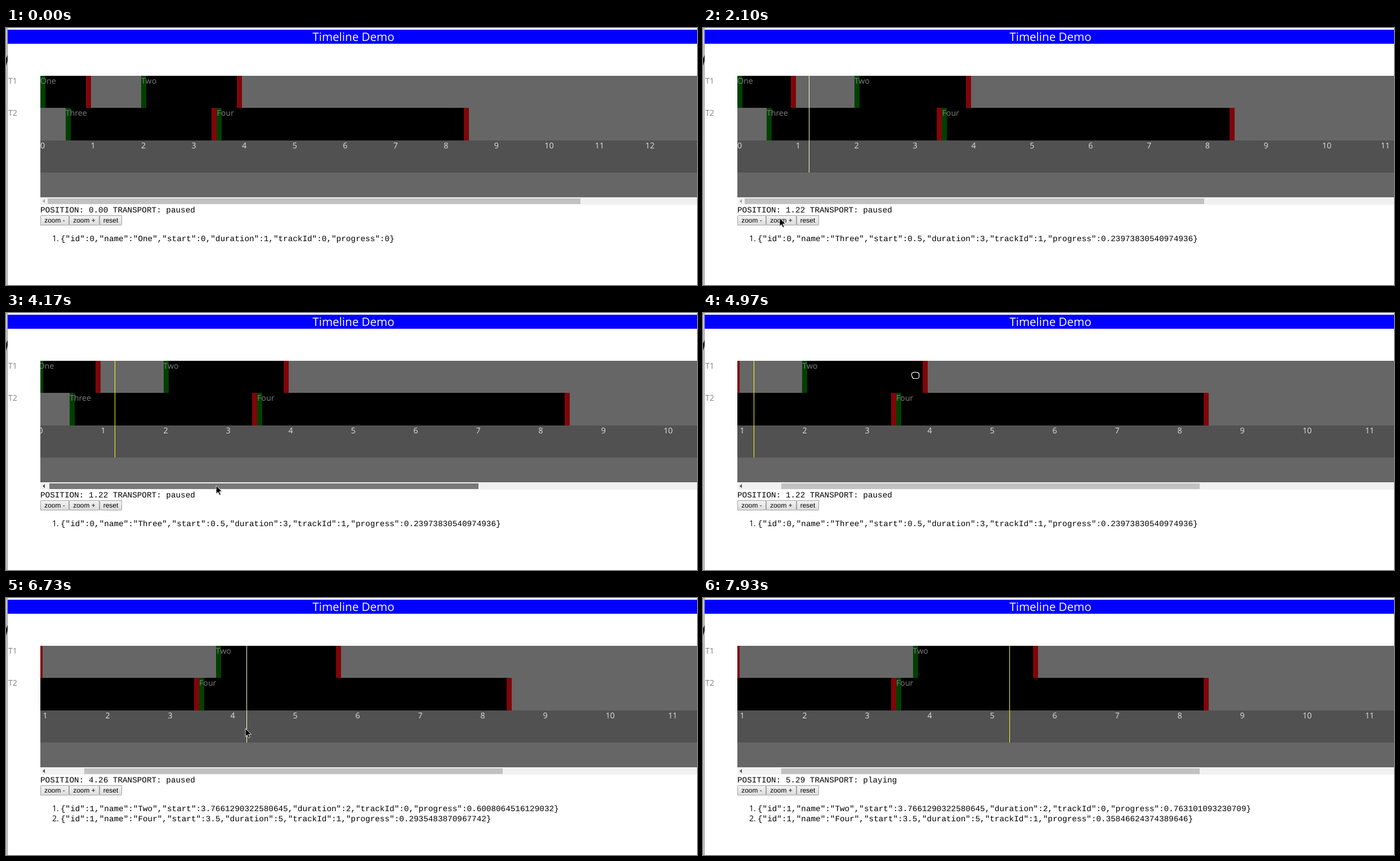
An HTML page that plays this animation: 1227 by 457 pixels, repeating every 8000 ms.

```html
<!DOCTYPE html>
<html lang="en">
<head>
<meta charset="utf-8">
<title>Timeline Demo</title>
<style>
  html, body { margin: 0; width: 100%; height: 100%; overflow: hidden; background: #fff; }
  svg { display: block; width: 1227px; height: 457px; }
  rect { shape-rendering: crispEdges; }
  text { font: 14.2px "Open Sans", "Noto Sans", sans-serif; text-rendering: geometricPrecision; }
  .title { font-size: 20.6px; fill: #fff; text-anchor: middle; }
  .mono { font: 14.325px "Liberation Mono", monospace; }
  .grey { fill: #808080; }
  .tick { fill: #e2e2e2; }
  .button text { font: 11.93px "Liberation Sans", sans-serif; text-anchor: middle; }
  .button rect { fill: url(#face); stroke: #a3a3a3; }
  .button.down rect { fill: url(#pressed); }
</style>
</head>
<body>
<svg id="stage" viewBox="0 0 1227 457">
  <defs>
    <clipPath id="view"><rect x="61" y="85" width="1166" height="216"/></clipPath>
    <linearGradient id="face" x2="0" y2="1"><stop stop-color="#f4f4f4"/><stop offset="1" stop-color="#dcdcdc"/></linearGradient>
    <linearGradient id="pressed" x2="0" y2="1"><stop stop-color="#dadada"/><stop offset="1" stop-color="#efefef"/></linearGradient>
    <linearGradient id="edge"><stop stop-color="#d8d8d8"/><stop offset="1" stop-color="#9a9a9a"/></linearGradient>
  </defs>
  <rect width="3" height="457" fill="url(#edge)"/>
  <path d="M0 54L3 48V58L0 67Z" fill="#222"/>
  <rect x="3" y="3" width="1224" height="25" fill="#00f"/>
  <text class="title" x="617" y="23">Timeline Demo</text>
  <text class="grey" x="4" y="98.5">T1</text>
  <text class="grey" x="4" y="156">T2</text>

  <rect x="61" y="85" width="1166" height="216" fill="#666"/>
  <rect x="61" y="200" width="1166" height="57" fill="#515151"/>
  <g clip-path="url(#view)">
    <g id="clips"></g>
    <g id="ticks"></g>
    <rect id="head" y="85" width="1" height="172"/>
  </g>

  <rect x="61" y="301" width="1166" height="13" fill="#f1f1f1"/>
  <path id="arrow" d="M65 307.7L69 304V311.4Z"/>
  <rect id="thumb" y="303" height="10"/>

  <text class="mono" id="status" x="61" y="328.3"></text>
  <g id="buttons"></g>
  <g id="list"></g>

  <path id="pointer" d="M0 0V14.5L3.4 11.4L5.8 16.8L8.2 15.7L5.8 10.5H10.6Z" fill="#000" stroke="#eee" stroke-width=".9"/>
  <path id="fist" d="M-6.5 1Q-6.500 -.5 -4.500 -.3L-3.500 -1.500Q-2 -2.300 -.500 -1.400Q1 -2.200 2.500 -1.200Q4 -1.700 5 -.6Q6.800 -.5 6.600 2V6.500Q6.300 9 4.500 9.500H-3Q-5 9 -6 5Q-7 3 -6.500 1Z" fill="#000" stroke="#fff" stroke-width="1.2"/>
</svg>
<script>
const LOOP = 8000;
const SCALE = 0.8953;      // stage pixels per page pixel
const LEFT = 61;
const ZOOM = 124;          // page pixels per second, fully zoomed
const PAUSE_AT = 1.2192149162292481;

const clips = [
  { id: 0, name: "One", start: 0, duration: 1, trackId: 0 },
  { id: 1, name: "Two", start: 2, duration: 2, trackId: 0 },
  { id: 0, name: "Three", start: 0.5, duration: 3, trackId: 1 },
  { id: 1, name: "Four", start: 3.5, duration: 5, trackId: 1 },
];

// pointer path: time, x, y
const path = [
  [840, 114, 462], [870, 113, 453], [1000, 118, 408], [1400, 136, 338],
  [2370, 136, 338], [3130, 313, 296], [3270, 313, 296], [3330, 326, 293],
  [3500, 326, 293], [4080, 371, 307], [4130, 371, 307], [4170, 373, 307],
  [4600, 436, 306], [4700, 436, 306], [4940, 377, 107], [5170, 377, 107],
  [5570, 573, 107], [5730, 573, 107], [6050, 470, 232], [6450, 503.5, 232],
  [6570, 503.5, 232], [6730, 425, 232], [7300, 425, 232], [7620, 300, 411],
];

const $ = id => document.getElementById(id);
const clamp = (v, lo, hi) => Math.min(hi, Math.max(lo, v));
const within = (t, a, b) => t >= a && t < b;

function add(parent, tag, attrs = {}, text = "") {
  const el = document.createElementNS("http://www.w3.org/2000/svg", tag);
  set(el, attrs);
  el.textContent = text;
  parent.append(el);
  return el;
}
function set(el, attrs) {
  for (const key in attrs) el.setAttribute(key, attrs[key]);
}
function show(el, on) {
  el.style.display = on ? "" : "none";
}

const clipParts = clips.map(c => {
  const y = c.trackId ? 142 : 85, height = c.trackId ? 58 : 57;
  const bar = fill => add($("clips"), "rect", { y, height, width: 9, fill });
  return {
    body: bar("#000"), from: bar("#004000"), to: bar("#800509"),
    label: add($("clips"), "text", { class: "grey", y: c.trackId ? 156 : 98.5 }, c.name),
  };
});
const ticks = Array.from({ length: 16 }, (_, i) =>
  add($("ticks"), "text", { class: "tick", y: 213.5 }, i));
const buttons = [["zoom -", 61, 51], ["zoom +", 112, 54], ["reset", 166, 40]].map(([name, x, w]) => {
  const g = add($("buttons"), "g", { class: "button" });
  add(g, "rect", { x: x + 0.5, y: 333.5, width: w - 1, height: 17, rx: 1.5 });
  add(g, "text", { x: x + w / 2, y: 346.3 }, name);
  return g;
});
const rows = [0, 1].map(i => {
  const y = 379.3 + i * 18;
  const g = add($("list"), "g");
  add(g, "text", { x: 82, y }, i + 1 + ".");
  return { g, text: add(g, "text", { class: "mono", x: 97, y }) };
});

function pointerAt(t) {
  const i = path.findIndex(p => p[0] > t);
  if (i < 1) return i ? path[path.length - 1].slice(1) : path[0].slice(1);
  const [t0, x0, y0] = path[i - 1], [t1, x1, y1] = path[i];
  const k = (t - t0) / (t1 - t0);
  return [x0 + (x1 - x0) * k, y0 + (y1 - y0) * k];
}

const zoomAt = t => t < 1770 ? 100 : t < 2095 ? 108 : t < 2230 ? 116 : ZOOM;
const scrollAt = t => (pointerAt(clamp(t, 4130, 4700))[0] - 371) * 119 / 65;
const draggedStart = t =>
  2 + Math.round((pointerAt(clamp(t, 5170, 5570))[0] - 377) / SCALE) / ZOOM;

// playback advances in 30 ms ticks around a known position
const played = (t, anchor, pos) => pos + Math.floor((t - anchor + 2) / 30) * 0.03;

function positionAt(t) {
  if (t < 200) return 0;
  if (t < 6060) return Math.min(PAUSE_AT, played(Math.min(t, 1500), 870, 0.7188659906387329));
  if (t < 6930) {
    const x = pointerAt(Math.min(t, 6730))[0] + 2.5;
    return Math.round((x - LEFT) / SCALE + 119) / ZOOM;
  }
  return played(Math.min(t, 7930), 7930, 5.292331218719482);
}

function render(t) {
  const [mx, my] = pointerAt(t);
  const unit = zoomAt(t) * SCALE;
  const scroll = scrollAt(t);
  const toX = s => LEFT - scroll * SCALE + s * unit;
  const pos = positionAt(t);
  const seeking = within(t, 6060, 6930);
  const playing = within(t, 200, 1380) || t >= 6930;

  clips[1].start = draggedStart(t);
  clips.forEach((c, i) => {
    const p = clipParts[i], a = toX(c.start), b = toX(c.start + c.duration);
    set(p.body, { x: a, width: b - a });
    set(p.from, { x: a });
    set(p.to, { x: b - 9 });
    set(p.label, { x: a });
  });
  ticks.forEach((el, i) => set(el, { x: toX(i) }));

  const lead = !playing ? 0 : t < 2000 ? 0.03 : 0.018;
  const pale = seeking || within(t, 1670, 2370);
  set($("head"), { x: Math.round(toX(pos + lead)), fill: pale ? "#ffffd0" : "#ffff20" });
  show($("head"), pos > 0);

  // scrollbar
  const x = 74.4 + scroll * SCALE * 0.61;
  const width = 946 * 100 / zoomAt(t) - 20 * scroll / 119;
  const hover = within(my, 301, 314) && within(mx, x, x + width);
  const held = within(t, 4110, 4650);
  set($("thumb"), { x, width, fill: held ? "#787878" : hover ? "#a8a8a8" : "#c1c1c1" });
  set($("arrow"), { fill: scroll > 0 ? "#505050" : "#a3a3a3" });

  const down = within(t, 1670, 1770) || within(t, 1970, 2095) || within(t, 2130, 2230);
  buttons[1].classList.toggle("down", down);

  $("status").textContent =
    `POSITION: ${pos.toFixed(2)} TRANSPORT: ${playing ? "playing" : "paused"}`;

  // the list trails behind while seeking
  const at = seeking ? positionAt(Math.min(t - 160, 6570)) : pos;
  const active = clips.filter(c => within(at, c.start, c.start + c.duration));
  rows.forEach((row, i) => {
    const c = active[i];
    show(row.g, c);
    if (c) row.text.textContent =
      JSON.stringify({ ...c, progress: (at - c.start) / c.duration });
  });

  const visible = within(t, 840, 7620);
  const grabbing = within(t, 4880, 5640);
  for (const [id, on] of [["pointer", !grabbing], ["fist", grabbing]]) {
    show($(id), visible && on);
    set($(id), { transform: `translate(${mx} ${my})` });
  }
}

const begin = performance.now();
function frame() {
  render((performance.now() - begin) % LOOP);
  requestAnimationFrame(frame);
}
frame();
</script>
</body>
</html>
```
